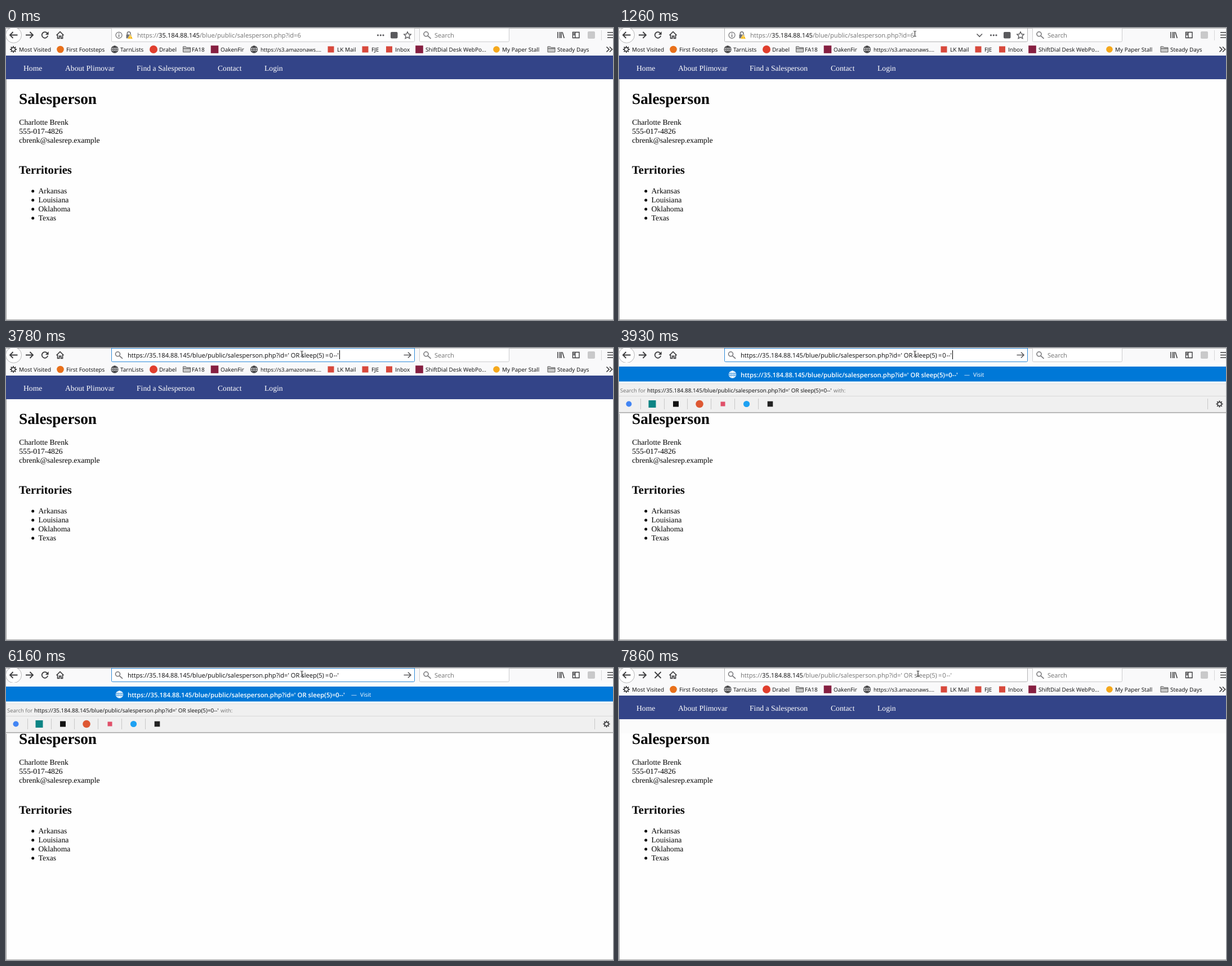
An HTML page for the animation above (8000 ms loop, 1078 by 519 pixels).

```html
<!DOCTYPE html>
<html lang="en">
<head>
<meta charset="utf-8">
<title>Salesperson</title>
<style>
html, body { margin: 0; width: 100%; height: 100%; overflow: hidden; background: #fefefe; }
svg { display: block; width: 100vw; height: 100vh; }
text { text-rendering: geometricPrecision; white-space: pre; }
.ui { font-family: "Open Sans", "Noto Sans", sans-serif; }
.page { font-family: "Liberation Serif", "Times New Roman", serif; font-size: 13.65px; }
.line { fill: none; stroke: #3d3d3f; stroke-width: 1.6; }
</style>
</head>
<body>
<svg id="stage" viewBox="0 0 1078 519" preserveAspectRatio="none"></svg>
<script>
const LOOP = 8000;
const BLUE = '#0078d7', DARK = '#0c0c0d', GREY = '#737373';

const ui = (x, y, s, size = 10, fill = DARK, more = '') =>
  `<text class="ui" x="${x}" y="${y}" font-size="${size}" fill="${fill}" ${more}>${s}</text>`;
const page = (x, y, s, more = '') => `<text class="page" x="${x}" y="${y}" ${more}>${s}</text>`;
const rect = (x, y, w, h, fill, more = '') =>
  `<rect x="${x}" y="${y}" width="${w}" height="${h}" fill="${fill}" ${more}/>`;
const dot = (x, y, r, fill) => `<circle cx="${x}" cy="${y}" r="${r}" fill="${fill}"/>`;
const line = (d, more = '') => `<path class="line" d="${d}" ${more}/>`;
const at = (x, y, s) => `<g transform="translate(${x} ${y})">${s}</g>`;
// Shown only inside the given time windows, e.g. "0-140,720-860"
const during = (spans, s) => `<g data-on="${spans}">${s}</g>`;

const globe = (x, y, c = '#3d3d3f') => at(x, y,
  line('M-6 0a6 6 0 1 0 12 0a6 6 0 1 0 -12 0M-6 0H6M0 -6V6M-5 -3.2H5M-5 3.2H5' +
       'M0 -6C-4 -3 -4 3 0 6C4 3 4 -3 0 -6', `style="stroke:${c};stroke-width:1.1"`));
const folder = (x, y) => at(x, y,
  '<path d="M-6.5 4.8V-5h4.6l1.6 1.8h6.8v8z" fill="#c9c9c9" stroke="#5c5c5c"/>' +
  '<path d="M-6.5 -1.4h13" stroke="#5c5c5c"/>');
const gear = (x, y) => {
  let teeth = '';
  for (let i = 0; i < 8; i++) {
    const a = i * Math.PI / 4, c = Math.cos(a), s = Math.sin(a);
    teeth += `M${c * 3.6} ${s * 3.6}L${c * 6} ${s * 6}`;
  }
  return at(x, y, '<circle class="line" r="3.4"/>' + line(teeth, 'style="stroke-width:1.8"'));
};
const lens = (x, y) => at(x, y,
  line('M-6 -1.7a4 4 0 1 0 8 0a4 4 0 1 0 -8 0M1 1.3L6.5 6.3', 'style="stroke:#77777a"'));
const square = (x, y, r, c) => rect(x - r, y - r, 2 * r, 2 * r, c);

// Address text; q is the query value, host and rest set the colours
const address = (x, y, q, size, host, rest, more = '') => ui(x, y,
  `https://<tspan fill="${host}">35.184.88.145</tspan>/blue/public/salesperson.php?id=${q}`,
  size, rest, more);
const probe = `' OR sleep(5)<tspan dx="2">=</tspan><tspan dx="1">0</tspan><tspan dx=".7">--'</tspan>`;
const plain = `' OR sleep(5)=0--'`;

const bookmarks = [
  [23, 'Most Visited', gear(13, 38)],
  [107, 'First Footsteps', dot(96.5, 38, 6.3, '#e8701a')],
  [203, 'TarnLists', globe(193, 38)],
  [272, 'Drabel', dot(262, 38, 7, '#e03e2d')],
  [330, 'FA18', folder(321, 38)],
  [381, 'OakenFir', square(370.5, 38, 6.8, '#861f41')],
  [452, 'https://s3.amazonaws....', globe(440.5, 38), 9.55],
  [588, 'LK Mail', square(577, 38, 5.5, '#d8493c')],
  [649, 'FJE', square(638, 38, 5.5, '#d8493c')],
  [691, 'Inbox', square(680.5, 38, 5.5, '#d8493c')],
  [745, 'ShiftDial Desk WebPo...', square(734, 38, 6.8, '#861f41')],
  [881, 'My Paper Stall', dot(871, 38, 5.8, '#f5a81c')],
  [979, 'Steady Days', folder(968.5, 38)]
];
const menu = [[31, 'Home'], [105, 'About Plimovar'], [232, 'Find a Salesperson'], [376, 'Contact'], [459, 'Login']];
const person = ['Charlotte Brenk', '555-017-4826', 'cbrenk@salesrep.example'];
const states = ['Arkansas', 'Louisiana', 'Oklahoma', 'Texas'];

const site =
  rect(0, 49, 1078, 42, '#334488') +
  menu.map(([x, s]) => page(x, 76, s, 'fill="#fff"')).join('') +
  during('6560-8000', rect(0, 91, 1078, 25, '#fbfbfb')) +
  page(23, 135, 'Salesperson', 'style="font-size:27.3px;font-weight:bold"') +
  person.map((s, i) => page(23.3, 172 + 16 * i, s)).join('') +
  page(23, 259, 'Territories', 'style="font-size:20.5px;font-weight:bold"') +
  states.map((s, i) => dot(47.7, 290 + 16 * i, 2.5, '#000') + page(57.5, 294 + 16 * i, s)).join('') +
  rect(0, 91, 1, 428, '#9c9c9c') + rect(0, 518, 1078, 1, '#a9a9a9');

const field = (x, w, c) => rect(x + .5, -3.5, w - 1, 28, '#fff', `rx="2" stroke="${c}"`) +
  rect(x + 1, 0, w - 2, 1, c);
const toolbar =
  rect(0, 0, 1078, 49, '#f9f9fa') + rect(0, 0, 1078, 1, '#b4b4b4') +
  '<circle cx="13.5" cy="12.5" r="14" fill="#fff" stroke="#b5b5b6"/>' +
  line('M20.5 12.5H7M12.5 7L7 12.5L12.5 18', 'style="stroke-width:1.8"') +
  line('M35 12.5H48M42.5 7L48 12.5L42.5 18', 'style="stroke-width:1.8"') +
  during('0-6920',
    line('M73.2 9.2A5.3 5.3 0 1 0 74.2 13.6', 'style="stroke-width:1.8"') +
    '<path d="M75.6 6.3V12H69.9z" fill="#3d3d3f"/>') +
  during('6920-7050', line('M65.5 9L72.5 16M72.5 9L65.5 16', 'style="stroke-width:1.8"')) +
  during('7050-8000', line('M63.5 7L74.5 18M74.5 7L63.5 18', 'style="stroke-width:1.8"')) +
  line('M89.5 13L96 6.7L102.5 13M91.6 12V18.3H94.7V14.3H97.6V18.3H100.5V12', 'style="stroke-width:1.7"') +
  during('0-1130', field(187, 539, '#cccccd')) +
  during('1130-1430,6560-8000', field(187, 539, '#b3b3b5')) +
  during('1430-6560', field(187, 539, '#2d8ad9')) +
  field(734, 160, '#cccccd') + lens(748, 12.5) + ui(761, 17, 'Search', 11.1, GREY) +
  line('M980 7V18M983.5 7V18M986 7V18M988 7.2L991.3 18', 'style="stroke-width:1.5"') +
  line('M1006.5 7.5H1018V17.5H1006.5zM1010.8 8V17.5M1007.5 10H1010M1007.5 12.3H1010', 'style="stroke-width:1.4"') +
  rect(1033, 6, 13, 13, '#c9c9ca', 'rx="2"') +
  rect(1057, 4, 1, 18, '#d8d8d9') +
  line('M1068 8H1078M1068 12.5H1078M1068 17H1078', 'style="stroke-width:1.7"');

const identity =
  '<circle class="line" cx="200.5" cy="12.8" r="5.5" style="stroke:#6b6b6e;stroke-width:1.2"/>' +
  rect(199.8, 11.8, 1.5, 4.2, '#6b6b6e') + rect(199.8, 9.2, 1.5, 1.5, '#6b6b6e') +
  line('M215.3 12V9.5a2.8 2.8 0 0 1 5.6 0V12', 'style="stroke:#727275"') +
  rect(213.5, 11.5, 9, 7, '#727275', 'rx="1"') +
  '<path d="M220.5 11.2L225.3 19.2H215.8z" fill="#f7b500" stroke="#fff" stroke-width=".6"/>' +
  rect(220, 13.8, 1, 2.6, '#fff') + rect(220, 17, 1, 1, '#fff');
const actions =
  [660.5, 665.3, 670].map(x => dot(x, 12.8, 1.6, '#5c5c5f')).join('') +
  rect(683, 7, 12.5, 11.5, '#5a5a5d', 'rx="2"') +
  line('M713 6.8L714.9 10.8L719.2 11.3L716 14.3L716.9 18.6L713 16.4L709.1 18.6L710 14.3L706.8 11.3L711.1 10.8z',
    'style="stroke:#5c5c5f;stroke-width:1.4"');
const chevron = line('M635.5 10.5L640.3 15.3L645 10.5', 'style="stroke:#5c5c5f"');

const addressBar =
  during('0-3780', identity + actions) +
  during('1130-1260', `<g opacity=".5">${chevron}</g>`) +
  during('1260-3780', chevron) +
  during('0-1430', address(233, 17, '6', 11.18, DARK, GREY)) +
  during('1430-1840', rect(233, 4, 291, 16, BLUE) + address(233, 17, '6', 11.18, '#fff', '#fff')) +
  during('1840-3780', rect(518, 4, 6, 16, BLUE) +
    address(233, 17, '<tspan fill="#fff">6</tspan>', 11.18, DARK, DARK)) +
  during('3780-8000', lens(200.5, 12.5)) +
  during('3780-6560', address(216, 17, probe, 11.18, DARK, DARK) +
    line('M706.5 12.5H719M714 7.5L719 12.5L714 17.5', 'style="stroke:#5c5c5f"')) +
  during('6560-8000', address(216, 17, probe, 11.18, DARK, GREY)) +
  during('3780-4060,4590-5010,5580-6160', rect(592, 4, 1, 16, '#000'));

const bookmarkBar =
  during('860-990', rect(431, 28, 132, 18, '#ebebec', 'rx="2"')) +
  during('990-1130', rect(431, 28, 132, 18, '#dededf', 'rx="2"')) +
  bookmarks.map(([x, s, icon, size]) => icon + ui(x, 42, s, size)).join('') +
  line('M1066.5 33.5L1071 38L1066.5 42.5M1072 33.5L1076.5 38L1072 42.5');

const engines = [
  dot(17.5, 99.5, 5, '#4285f4'), square(59, 99.5, 6.5, '#0c8484'), square(101, 99.5, 5, '#111'),
  dot(143, 99.5, 6.8, '#de5833'), square(184.5, 99.5, 4, '#e0506a'), dot(226.5, 99.5, 5.6, '#1da1f2'),
  square(268.5, 99.5, 4.8, '#222')
];
const dropdown =
  rect(0, 26, 1078, 89, '#fcfcfc') +
  rect(0, 33, 1078, 26.5, BLUE) + globe(201.5, 47, '#fff') +
  address(216, 51.5, plain, 11.3, '#fff', '#fff', 'font-weight="600"') +
  ui(613, 51, '—', 10, '#e4f0fa') + ui(629, 51, 'Visit', 10, '#fff') +
  rect(0, 63, 1078, 51, '#f0f0f0') + rect(0, 63, 1078, 1, '#dedede') +
  ui(2, 78.5, 'Search for', 9.5, GREY) +
  address(50, 78.5, plain, 9.87, DARK, DARK) + ui(381, 78.5, 'with:', 9.4, GREY) +
  rect(0, 85, 1078, 1, '#d9d9d9') +
  engines.join('') +
  [38, 80, 121, 163, 205, 247, 1045].map(x => rect(x, 90, 1, 19, '#c8c8c8')).join('') +
  gear(1066.5, 99.5) +
  rect(0, 114, 1078, 1, '#a3a3a3') + rect(0, 115, 1078, 1, '#d6d6d6') + rect(0, 116, 1078, 1, '#f2f2f2');

const arrow = (x, y) => at(x, y,
  '<path d="M.5 .5V9L2.6 7.2L4 10.4L5.3 9.9L4 6.7H6.5z" fill="#fff" stroke="#000" stroke-width=".7"/>');
const beam = (x, y) => at(x, y,
  '<path d="M-2.2 -4.6H-.6L0 -4L.6 -4.6H2.2M0 -4V4M-2.2 4.6H-.6L0 4L.6 4.6H2.2" fill="none" stroke="#111"/>');
const pointer =
  during('140-720', arrow(422, 219)) +
  during('720-860', arrow(540, 69)) +
  during('860-1130', arrow(535, 35)) +
  during('1130-7860', beam(525.5, 10.3)) +
  during('7860-8000', beam(531, 10));

const stage = document.getElementById('stage');
stage.innerHTML = site + toolbar + addressBar + bookmarkBar + during('3930-6560', dropdown) + pointer;

const timed = [...stage.querySelectorAll('[data-on]')].map(el => ({
  el, spans: el.dataset.on.split(',').map(s => s.split('-').map(Number))
}));

function draw(t) {
  for (const { el, spans } of timed) {
    el.style.display = spans.some(([a, b]) => t >= a && t < b) ? '' : 'none';
  }
}

const start = performance.now();
function tick() {
  draw((performance.now() - start) % LOOP);
  requestAnimationFrame(tick);
}
tick();
</script>
</body>
</html>
```
